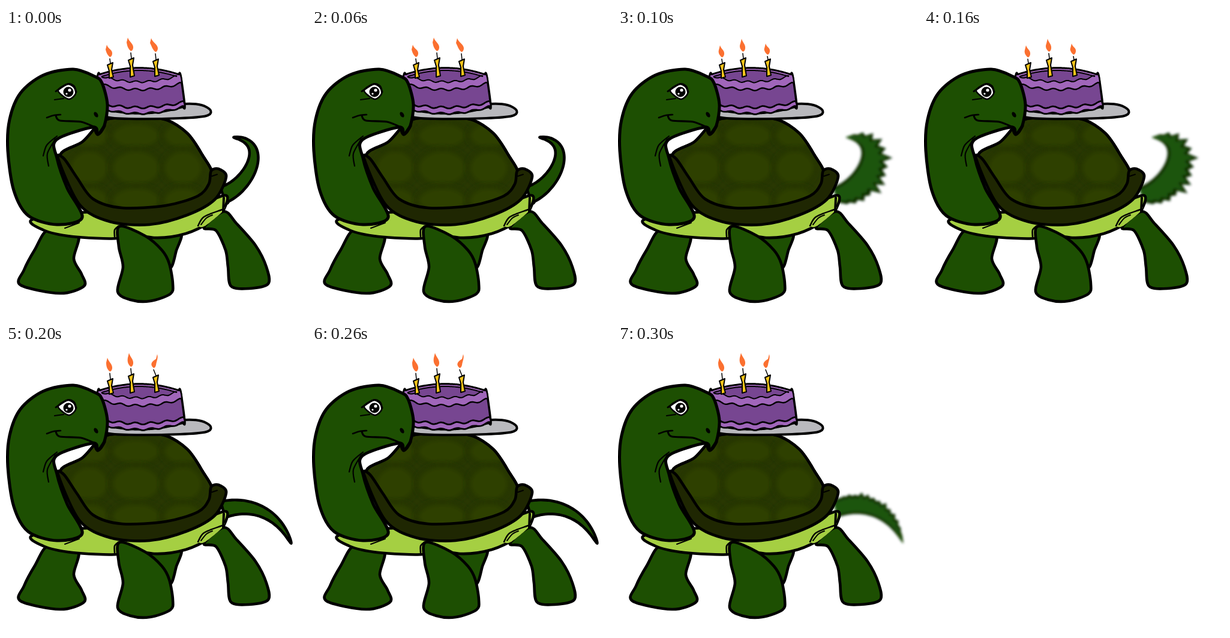
Write an HTML page that moves like this. It is 500 px wide and 482 px high and loops after 0.4 s.

```html
<!DOCTYPE html>
<html lang="en">
<head>
<meta charset="utf-8">
<title>Turtle with a cake</title>
<style>
  html, body { margin: 0; width: 100%; height: 100%; overflow: hidden; background: #fff; }
  svg { display: block; width: 100%; height: 100%; }
</style>
</head>
<body>
<svg id="stage" viewBox="0 0 500 482" fill="none" stroke-linecap="round" stroke-linejoin="round">
  <defs>
    <filter id="soft" x="-30%" y="-30%" width="160%" height="160%"><feGaussianBlur stdDeviation="4"/></filter>
    <filter id="smear" x="-30%" y="-30%" width="160%" height="160%"><feGaussianBlur stdDeviation="2"/></filter>
  </defs>
</svg>
<script>
const stage = document.getElementById('stage');
const SKIN = '#1d4f02', INK = '#000', BELLY = '#a5cf42', RIM = '#1f2702';
const LILAC = '#a066ba', PURPLE = '#774691', FLAME = '#fb7030';

function add(tag, attrs, parent = stage) {
  const el = document.createElementNS('http://www.w3.org/2000/svg', tag);
  for (const key in attrs) el.setAttribute(key, attrs[key]);
  return parent.appendChild(el);
}

// Catmull-Rom curve through an array or a string of "x,y" points
function curve(pts, closed) {
  const p = typeof pts === 'string' ? pts.split(' ').map(s => s.split(',').map(Number)) : pts;
  const n = p.length;
  const at = i => p[closed ? (i + n) % n : Math.max(0, Math.min(n - 1, i))];
  let d = 'M' + p[0];
  for (let i = 0; i < (closed ? n : n - 1); i++) {
    const [a, b, c, e] = [at(i - 1), at(i), at(i + 1), at(i + 2)];
    d += `C${b.map((v, k) => v + (c[k] - a[k]) / 6.5)} ${c.map((v, k) => v - (e[k] - b[k]) / 6.5)} ${c}`;
  }
  return closed ? d + 'Z' : d;
}

const shape = (pts, fill, width = 4.6, parent = stage) =>
  add('path', { d: curve(pts, true), fill, stroke: width ? INK : 'none', 'stroke-width': width }, parent);
const line = (pts, width = 2.6) => add('path', { d: curve(pts), stroke: INK, 'stroke-width': width });
const range = n => Array.from({ length: n + 1 }, (_, i) => i / n);

function random(seed) {
  return () => (seed = seed * 16807 % 2147483647) / 2147483647;
}

// A tail tapers along a cubic spine; fringe adds ragged smear to one side
const UP = [[362, 279], [405, 264], [442, 190], [380, 183]];
const DOWN = [[362, 277], [400, 266], [450, 276], [475, 333]];

function tailOutline(spine, side, fringe, trim = 0) {
  const rnd = random(77);
  const mix = (u, k) => {
    const [a, b, c, d] = spine.map(p => p[k]), v = 1 - u;
    return v * v * v * a + 3 * v * v * u * b + 3 * v * u * u * c + u * u * u * d;
  };
  const edges = [[], []];
  range(30).forEach((u, i) => {
    const x = mix(u, 0), y = mix(u, 1);
    const dx = mix(u + .01, 0) - x, dy = mix(u + .01, 1) - y, len = Math.hypot(dx, dy);
    const half = Math.max(.5, 13.5 * (1 - u) ** .7 + .5 - trim);
    const spike = fringe * Math.sin(Math.PI * u ** .85) * (i % 2 ? .65 : .8 + .4 * rnd());
    [1, -1].forEach((s, k) => {
      const r = s * (half + (s === side ? spike : 0));
      edges[k].push([x - dy / len * r, y + dx / len * r]);
    });
  });
  return [...edges[0], ...edges[1].reverse()];
}

function smearedTail(spine, side, fringe, trim) {
  const g = add('g', { filter: 'url(#smear)' });
  add('polygon', { points: tailOutline(spine, side, fringe).join(' '), fill: '#0d2a05' }, g);
  add('polygon', { points: tailOutline(spine, side, fringe * .9, trim).join(' '), fill: '#1d5409' }, g);
  return g;
}

const tails = [
  shape(tailOutline(UP, 1, 0), SKIN),
  smearedTail(UP, 1, 35, 5),
  shape(tailOutline(DOWN, 1, 0), SKIN),
  smearedTail(DOWN, -1, 14, 4)
];

// Legs and belly
shape('232,340 290,340 284,372 270,402', SKIN);
shape('72,336 48,371 30,405 24,430 90,444 130,432 126,412 113,386 120,345', SKIN);
shape('45,320 62,338 110,349 184,352 190,340 247,351 300,344 345,322 363,304 364,280 290,312 230,324 150,308', BELLY);
shape('189,332 188,366 195,400 186,441 208,455 240,457 274,445 278,428 272,394 260,372 232,348', SKIN);
shape('330,334 350,339 366,372 370,400 375,432 405,436 437,428 434,400 416,364 384,327 363,307', SKIN);
shape('321,331 330,316 361,299 361,307 332,331', BELLY, 0);
line('363,284 362,307', 4);
line('320,331 330,316 360,304');
line('325,329 334,318 344,313', 2);
line('181,349 181,338 187,332');
line('98,335 122,326', 2);

// Shell with a grid of soft plates
const dome = '90,217 128,190 165,154 220,151 265,153 302,176 327,212 344,248 320,290 230,304 140,288';
const domeShape = shape(dome, '#293802');
add('path', { d: curve(dome, true) }, add('clipPath', { id: 'dome' }));
const plates = add('g', { 'clip-path': 'url(#dome)' });
for (const row of [-1, 0, 1]) for (const col of [-1, 0, 1]) {
  add('ellipse', {
    cx: 217 + col * 78, cy: 234 + row * 54, rx: 42 - 8 * Math.abs(col), ry: 31 - 8 * Math.abs(row),
    fill: '#2f4101', stroke: '#223101', 'stroke-width': 5, filter: 'url(#soft)'
  }, plates);
}
add('path', { d: domeShape.getAttribute('d'), stroke: INK, 'stroke-width': 4.6 });

// Plate and cake, built from bowed edges with an icing ripple
shape('166,138 240,134 298,127 326,129 341,138 334,147 290,151 205,152 168,149', '#b9b9bd', 4);

const edge = (y, bow, r, ripple = 0) => range(40).map(u => {
  const v = 2 * u - 1;
  return [222 + v * r, y + bow * (1 - v * v) + ripple * Math.sin(v * 18)];
});
const band = (top, bottom, fill, width) => shape([...top, ...bottom.reverse()], fill, width);

band(edge(79, -12, 69), edge(131, 12, 76), PURPLE, 3.6);
band(edge(79, -12, 69), edge(92, 11, 71, 1.8), LILAC, 2.4);
band(edge(81, -10, 62), edge(81, 9, 62, 1.5), PURPLE, 2);
band(edge(124, 9, 74, 1.8), edge(131, 12, 76, 1.5), LILAC, 2.8);

// Candles with flames; lean and dip hold one value per pose
const candles = [
  { x: 174, y: 59, foot: 83, lean: [-5, -3, -4], dip: [5, 6, 0] },
  { x: 209, y: 51, foot: 81, lean: [-5, -2, -3], dip: [1, 3, 0] },
  { x: 250, y: 53, foot: 80, lean: [-7, -3, 6], dip: [0, 9, 0] }
];
for (const c of candles) {
  const { x, y, foot } = c;
  add('path', {
    d: `M${x - 5} ${y + 3}L${x + 4} ${y - 1}L${x + 2} ${y + 11}L${x + 5} ${foot - 1}L${x - 2} ${foot + 1}L${x - 2} ${y + 13}Z`,
    fill: '#f6c51a', stroke: INK, 'stroke-width': 2
  });
  c.wick = add('path', { stroke: INK, 'stroke-width': 1.5 });
  c.flame = add('path', { fill: FLAME });
}

function burn({ x, y, lean, dip, wick, flame }, pose) {
  const bx = x - 1 - Math.max(0, lean[pose] / 2), by = y - 13 + dip[pose] / 2;
  const tx = bx + lean[pose], ty = y - 36 + dip[pose];
  flame.setAttribute('d', `M${tx} ${ty}C${tx + 2} ${ty + 7} ${bx + 5} ${by - 12} ${bx + 4} ${by - 5}` +
    `Q${bx + 3} ${by} ${bx} ${by}C${bx - 5} ${by - 4} ${bx - 6} ${by - 9} ${tx - 2} ${ty + 8}Z`);
  wick.setAttribute('d', `M${bx} ${by + 3}L${x} ${y}`);
}

// Neck and head
shape('148,81 112,69 62,79 24,109 6,153 3,205 13,272 37,314 85,329 127,317 102,268 85,218 84,187 145,166 153,178 164,163 169,128 160,92', SKIN, 5);
line('85,181 68,196 62,214', 2.2);
line('82,186 69,210 71,231', 2.2);
line('147,166 153,178 164,164', 5);

// Face
shape('87,104 102,94 113,99 116,110 106,119 95,114', '#fff', 2.6);
for (const [cx, cy, r, fill] of [[104, 107, 8.5, INK], [106, 104, 2.6, '#fff'], [101, 110, 1.6, '#fff']]) {
  add('circle', { cx, cy, r, fill });
}
line('83,106 102,94 113,97 117,107', 3);
line('81,120 96,118', 2.2);
line('68,150 80,146 91,145');
line('83,147 90,155 125,157 150,167', 3.2);
add('ellipse', { cx: 150, cy: 145, rx: 3, ry: 5, fill: INK, transform: 'rotate(-30 150 145)' });

// Rim of the shell
shape('87,219 97,219 118,250 145,286 193,301 267,297 320,281 338,261 342,239 355,236 367,249 348,287 302,313 239,329 173,324 123,296', RIM);
line('343,248 352,245', 2);

function draw(ms) {
  const step = Math.floor(ms / 100) % 4;
  tails.forEach((tail, i) => tail.setAttribute('display', i === step ? 'inline' : 'none'));
  candles.forEach(c => burn(c, Math.min(step, 2)));
}

function tick(now) {
  draw(now);
  requestAnimationFrame(tick);
}
draw(0);
requestAnimationFrame(tick);
</script>
</body>
</html>
```
